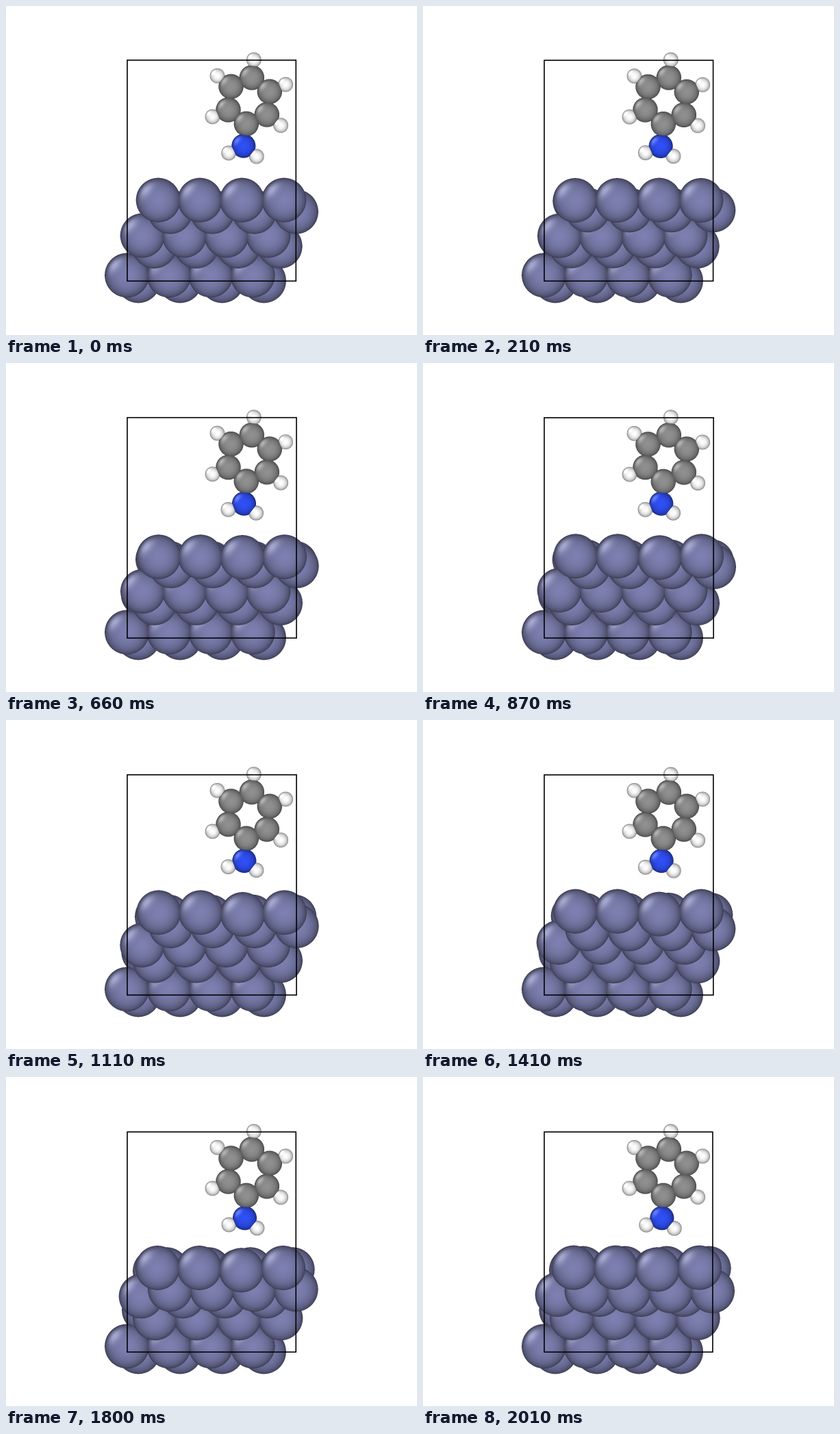
A matplotlib script that plays this animation: 600 px wide and 480 px high, repeating every 2.04 s.

```python
import numpy as np
import matplotlib.pyplot as plt
from matplotlib.animation import FuncAnimation
from matplotlib.patches import Rectangle

W, H, DPI = 600, 480, 100
FRAMES, STEP = 68, 30
SS = 3                                   # supersampling
X0, Y0, X1, Y1 = 135, 60, 465, 440       # rendered region

ZN = (125, 128, 176), 32.4
C = (144, 144, 144), 18.2
N = (48, 80, 248), 17.5
HY = (255, 255, 255), 10.9

PITCH = 61.2                             # spacing of slab atoms
FRONT_Y = 393, 335, 283.2                # bottom, middle, top layer
STILL = (0,), (0,)

# (layer, row) -> x and y motion as drift, bow, sway; row 0 is nearest
MOTION = {
    (2, 0): ((-2.2, 2, -0.4), (-5, 0.6, 0.9)),
    (2, 1): ((-1, 1.2), (12, -7.2, -2.2)),
    (2, 2): ((-5.7, 1.5), (-1.5, 4.5)),
    (2, 3): ((-6.5, 0.9), (-21, -1.3)),
    (1, 0): ((-3, 1.2), (-17.5, 3.5, 1.2)),
    (1, 1): ((1,), (0.8, 0, -0.8)),
    (1, 2): ((2.5,), (5, 1)),
}
SAG = 2.8, 1, -1.2                       # third top atom sinks

RING_X, RING_Y = 354.8, 138.1
TILT = 97                                # direction of the amine, degrees


def glide(s, drift, bow=0, sway=0):
    """Offset at progress s: steady drift with an arch and a swing."""
    return drift * s + bow * np.sin(np.pi * s) + sway * np.sin(2 * np.pi * s)


def make_sprite(color, radius):
    """Lit sphere: mask, height and colour on the supersampled grid."""
    n = int(np.ceil(radius * SS))
    y, x = np.mgrid[-n:n + 1, -n:n + 1] / (radius * SS)
    mask = x * x + y * y <= 1
    nz = np.sqrt(np.clip(1 - x * x - y * y, 0, 1))
    light = np.array([-1.8, 1.5, -0.2])
    light /= np.linalg.norm(light)
    facing = x * light[0] - y * light[1] + nz * light[2]
    gloss = 0.25 * np.clip(2 * facing * nz - light[2], 0, 1) ** 6
    rgb = np.array(color) / 255 * (0.4 + 0.6 * nz)[..., None]
    rgb = np.clip(rgb + gloss[..., None], 0, 1)
    return n, mask, (nz * radius).astype("f4"), rgb.astype("f4")


SPRITES = {kind: make_sprite(*kind) for kind in (ZN, C, N, HY)}


def stamp(rgb, depth, kind, x, y, z=0):
    n, mask, height, color = SPRITES[kind]
    col = round((x - X0) * SS - 0.5)
    row = round((y - Y0) * SS - 0.5)
    area = np.s_[row - n:row + n + 1, col - n:col + n + 1]
    seen = mask & (height + z > depth[area])
    depth[area][seen] = height[seen] + z
    rgb[area][seen] = color[seen]


def draw_slab(buf, s):
    for layer in range(3):
        for row in range(4):
            if row % 2:
                x, y = 193 + 23.5 * layer, 401 - 50.4 * layer
            else:
                x, y = 176.5 + 22.8 * layer, FRONT_Y[layer]
            z = 106 * (layer - 2) - 58 * row
            mx, my = MOTION.get((layer, row), STILL)
            x, y = x + glide(s, *mx), y + glide(s, *my)
            for i in range(4):
                loose = (layer, row, i) == (2, 0, 2)
                sag = glide(s, *SAG) if loose else 0
                stamp(*buf, ZN, x + i * PITCH, y + sag, z)


def draw_molecule(buf, s):
    cx, cy = RING_X, RING_Y + glide(s, 1, 0.4)

    def spoke(angle, scale):
        a = np.radians(angle)
        return cx + 32.8 * scale * np.cos(a), cy + 34 * scale * np.sin(a)

    for k in range(6):
        angle = TILT + 60 * k
        stamp(*buf, C, *spoke(angle, 1))
        if k:
            stamp(*buf, HY, *spoke(angle, 1.77))

    nx, ny = spoke(TILT, 1.96)
    stamp(*buf, N, nx + glide(s, 1.8), ny + glide(s, 0.5))
    hx, hy = nx + glide(s, 1, -1), ny + glide(s, 0.3, -1.4, -0.4)
    for side in (-58, 58):
        a = np.radians(TILT + side)
        stamp(*buf, HY, hx + 24.2 * np.cos(a), hy + 24.2 * np.sin(a))


def render(s):
    shape = (Y1 - Y0) * SS, (X1 - X0) * SS
    buf = np.ones(shape + (3,), "f4"), np.full(shape, -1e4, "f4")
    draw_slab(buf, s)
    draw_molecule(buf, s)
    return buf[0].reshape(Y1 - Y0, SS, X1 - X0, SS, 3).mean(axis=(1, 3))


fig = plt.figure(figsize=(W / DPI, H / DPI), dpi=DPI, facecolor="white")
ax = fig.add_axes([0, 0, 1, 1])
ax.set_axis_off()
image = ax.imshow(render(0), extent=(X0, X1, Y1, Y0),
                  interpolation="nearest", aspect="auto")
ax.set(xlim=(0, W), ylim=(H, 0))
box = ax.add_patch(Rectangle((177, 79), 246, 322, fill=False, ec="black",
                             lw=1.6 * 72 / DPI, joinstyle="miter", snap=False))


def update(frame):
    s = frame / (FRAMES - 1)
    image.set_data(render(s))
    right, top = 423.3 + glide(s, -0.4, 1), 79 + glide(s, 1.2, 0.3)
    box.set_bounds(177, top, right - 177, 401.3 - top)
    return image, box


anim = FuncAnimation(fig, update, frames=FRAMES, interval=STEP,
                     repeat=True, repeat_delay=0, blit=False)
plt.show()
```
